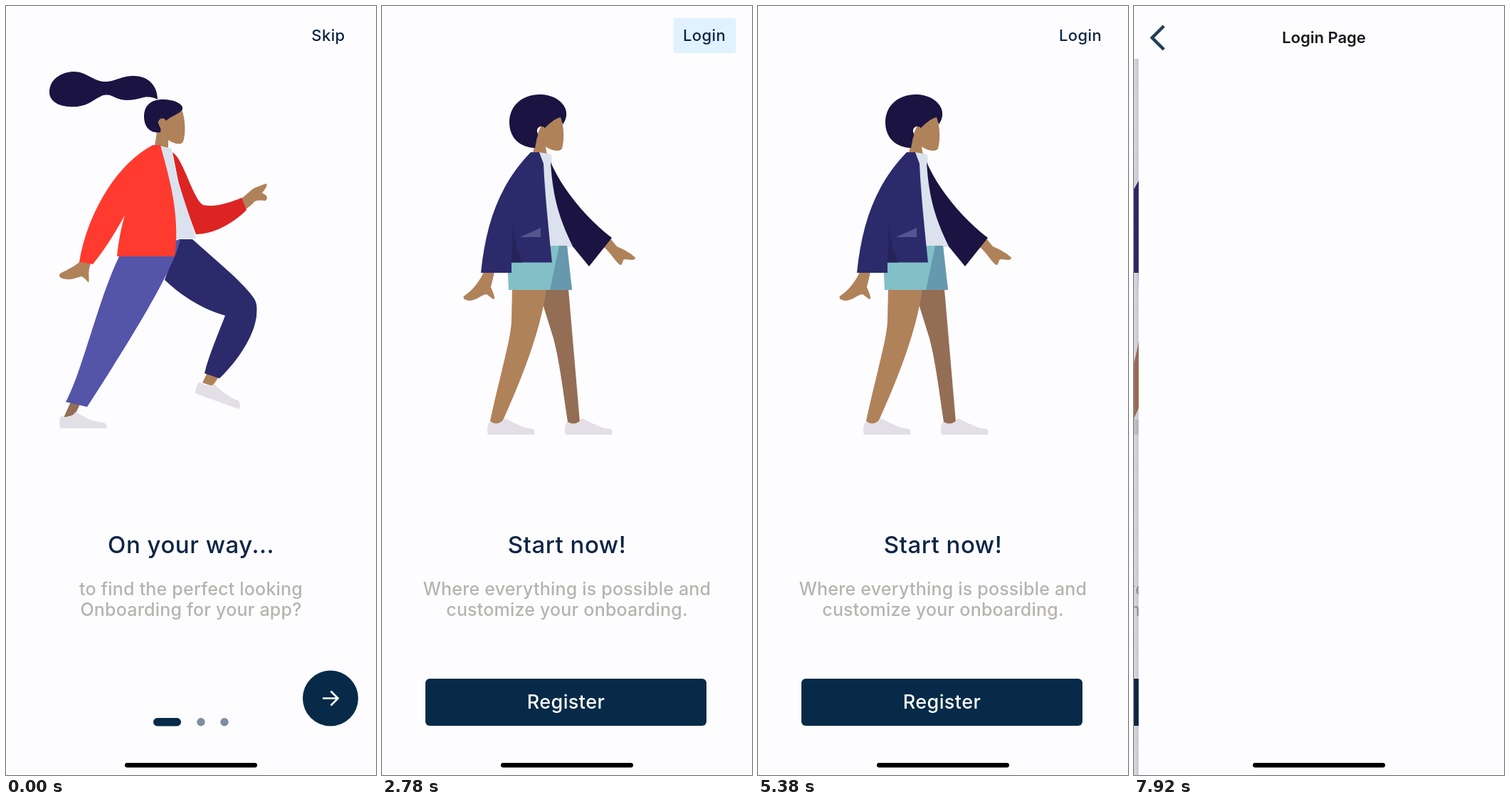
An HTML page that plays this animation: 520 px wide and 1078 px high, repeating every 8 s.

```html
<!DOCTYPE html>
<html lang="en">
<head>
<meta charset="utf-8">
<title>Onboarding</title>
<style>
html, body { margin: 0; height: 100%; overflow: hidden; background: #fdfcff; }
svg { display: block; width: 100vw; height: 100vh; }
text { font: 500 22px Inter, sans-serif; letter-spacing: .4px; text-anchor: middle; fill: #0c2545; }
.title { font-size: 33px; letter-spacing: .5px; }
.sub { font-size: 25px; letter-spacing: .2px; fill: #b6b4ae; }
.button { font-size: 27px; fill: #fff; }
.nav { font-weight: 600; letter-spacing: 0; fill: #18181b; }
.hair { fill: #1b1442; }
.skin { fill: #b0825a; }
.shade { fill: #936e55; }
.shoe { fill: #e3dfe6; }
.shirt { fill: #dbe2ee; }
.navy { fill: #2b2b6b; }
.brand { fill: #062a47; }
.dot { fill: #7d8ea0; }
</style>
</head>
<body>
<svg viewBox="0 0 520 1078" preserveAspectRatio="none">
  <defs>
    <linearGradient id="edge">
      <stop offset="0" stop-color="#2a1838" stop-opacity="0"/>
      <stop offset=".6" stop-color="#2a1838" stop-opacity=".07"/>
      <stop offset="1" stop-color="#2a1838" stop-opacity=".19"/>
    </linearGradient>
  </defs>
  <rect width="520" height="1078" fill="#fdfcff"/>

  <g id="intro">
    <path class="hair" d="M61 121C61 100 82 92 95 92C115 92 122 107 142 106C155 105 162 98 180 98C200 98 213 112 213 131C207 128 200 126 190 129C175 133 163 133 153 128C140 121 135 125 122 133C110 141 98 142 88 141C72 140 61 132 61 121Z"/>
    <path class="skin" d="M212 177L209 196L228 199V188C236 193 246 196 249 190C253 178 252 158 247 145L215 158Z"/>
    <path class="hair" d="M194 155C194 140 203 131 220 131C238 131 250 138 248 145C243 152 232 154 225 161C222 155 214 157 214 164C215 169 219 171 217 177C203 179 194 170 194 155Z"/>
    <path class="skin" d="M330 270C340 264 345 256 352 254L365 249C368 250 367 253 360 262L365 265C368 268 367 272 364 273C354 272 350 272 347 277L337 285Z"/>
    <path fill="#dc2423" d="M234 205C250 215 262 270 277 279C295 283 315 275 331 269L338 286C318 306 290 320 267 320L245 260Z"/>
    <path class="shirt" d="M217 196L233 200C235 235 258 290 267 326L238 327Z"/>
    <path class="skin" d="M283 514L299 520L290 533L276 528Z"/>
    <path class="navy" d="M243 327H262C290 352 330 385 345 405C353 415 353 420 352 435C348 465 325 498 300 522L279 515C285 490 300 455 308 434C275 425 245 405 223 384Z"/>
    <path class="shoe" d="M272 527C278 533 288 532 294 531C305 542 316 550 326 553C330 557 330 562 327 565L266 543C266 537 268 531 272 527Z"/>
    <path class="shade" d="M91 555L104 558L97 573L81 577Z"/>
    <path fill="#5455a8" d="M160 349L245 327C238 360 200 430 114 562L84 555C108 510 130 410 160 349Z"/>
    <path class="shoe" d="M77 574C83 578 92 577 98 569C108 575 120 583 137 584C142 586 142 590 141 592H76C75 586 75 580 77 574Z"/>
    <path class="skin" d="M104 358C98 364 88 369 76 375C73 379 77 383 86 383C93 384 98 381 106 379C110 381 113 384 116 388C118 383 114 374 119 361Z"/>
    <path fill="#ff3a2f" d="M206 195H217C226 230 246 290 237 351H156C158 330 162 310 167 293C155 315 140 340 122 362L103 359C112 300 150 225 206 195Z"/>
    <text class="title" x="260" y="767">On your way...</text>
    <text class="sub" x="260" y="826">to find the perfect looking</text>
    <text class="sub" x="260" y="855">Onboarding for your app?</text>
    <rect class="brand" x="207" y="998" width="39" height="11.5" rx="5.7"/>
    <circle class="dot" cx="274" cy="1003.7" r="5.7"/>
    <circle class="dot" cx="307" cy="1003.7" r="5.7"/>
    <circle class="brand" cx="456" cy="970.5" r="39"/>
    <path d="M445 970.5H466M456.500 960.500L466.500 970.500L456.500 980.500" fill="none" stroke="#fff" stroke-width="2.700"/>
  </g>

  <g id="start">
    <path class="skin" d="M217 183L212 206L232 209L230 197C238 203 249 205 253 200C257 185 255 165 251 155L225 165Z"/>
    <path class="hair" d="M215 199C192 198 179 183 179 163C179 139 198 124 222 124C244 124 261 138 259 154C258 160 256 163 254 166L251 156C242 158 234 166 229 171C224 166 217 170 218 176C219 180 220 181 218 184Z"/>
    <path class="skin" d="M320 325L330 337C340 341 352 348 356 353C356 357 350 356 341 355C337 357 339 361 336 363C330 362 325 350 312 338Z"/>
    <path class="shirt" d="M221 205L238 208C240 260 258 310 268 338L237 336Z"/>
    <path class="hair" d="M237 219C255 260 290 300 323 325L291 365L268 337C250 300 240 270 237 219Z"/>
    <path class="shade" d="M226 397H262L278 583C273 587 265 586 261 583C255 545 250 500 241 466L226 418Z"/>
    <path class="skin" d="M183 397H231C222 460 195 525 169 583C163 587 156 586 152 582C165 520 182 465 182 440Z"/>
    <path fill="#82bfc7" d="M176 358L236 336H260L267 398H178Z"/>
    <path fill="#6699ae" d="M249 336H260L267 398H236Z"/>
    <path id="shoe" class="shoe" d="M151 583C158 587 166 587 172 578C182 582 195 590 205 592C213 592 216 594 214 601H149C147 594 148 587 151 583Z"/>
    <use href="#shoe" x="109"/>
    <path class="skin" d="M143 373C137 386 127 399 116 406C112 409 116 412 122 413C133 413 139 405 147 404L156 411C160 411 158 406 153 394L158 373Z"/>
    <path class="navy" d="M209 205H221L227 221C229 265 234 310 239 359.500H182V374H139C146 305 165 250 209 205Z"/>
    <path fill="#25235a" d="M184 302C186 325 190 345 197 359.500H182Z"/>
    <path fill="#55558f" d="M194 324L223 311V324Z"/>
    <text class="title" x="260" y="767">Start now!</text>
    <text class="sub" x="260" y="826">Where everything is possible and</text>
    <text class="sub" x="260" y="855">customize your onboarding.</text>
    <rect class="brand" x="61" y="943" width="395" height="66" rx="6"/>
    <text class="button" x="258.500" y="985">Register</text>
  </g>

  <g id="cover">
    <rect id="dim" x="-520" width="520" height="1078" fill="#2a1838"/>
    <rect x="-17" width="17" height="1078" fill="url(#edge)"/>
    <rect width="520" height="1078" fill="#fdfcff"/>
  </g>
  <rect id="header" width="520" height="71" fill="#fdfcff"/>

  <rect id="glow" y="17" height="49" rx="4" fill="#e1f2ff"/>
  <text id="action" x="453" y="49"></text>
  <g id="nav">
    <path d="M42 28L25.500 44.500L42 61" fill="none" stroke="#203f57" stroke-width="4.500"/>
    <text class="nav" x="267" y="52">Login Page</text>
  </g>
  <rect x="167" y="1061" width="186" height="6.500" rx="3.200"/>
</svg>
<script>
const LOOP = 8000, PRESS = 2200, JUMP = 2700, RELEASE = 3700, PUSH = 7006;
const $ = id => document.getElementById(id);
const set = (id, name, value) => $(id).setAttribute(name, value);
const ramp = (v, from, to) => Math.min(1, Math.max(0, (v - from) / (to - from)));

// Critically damped spring from 0 to 1
function spring(ms) {
  const a = Math.max(0, ms) * .00695;
  return 1 - (1 + a) * Math.exp(-a);
}

function draw(t) {
  const onStart = t >= JUMP;
  set('intro', 'display', onStart ? 'none' : 'inline');
  set('start', 'display', onStart ? 'inline' : 'none');
  $('action').textContent = onStart ? 'Login' : 'Skip';

  set('glow', 'x', onStart ? 409.5 : 415);
  set('glow', 'width', onStart ? 88 : 77.5);
  set('glow', 'opacity', ramp(t, PRESS, PRESS + 120) * (1 - ramp(t, RELEASE, RELEASE + 200)));

  const p = spring(t - PUSH), late = ramp(p, .72, .97);
  const pushed = t > PUSH ? 'inline' : 'none';
  set('start', 'transform', `translate(${-p * 520 / 3} 0)`);
  set('cover', 'transform', `translate(${520 * (1 - p)} 0)`);
  set('cover', 'display', pushed);
  set('header', 'display', pushed);
  set('header', 'height', 71 + 3 * late);
  set('dim', 'opacity', .08 * late);
  set('action', 'opacity', 1 - p < .03 ? 0 : 1 - p);
  set('nav', 'opacity', late);
}

function tick() {
  draw(performance.now() % LOOP);
  requestAnimationFrame(tick);
}
tick();
</script>
</body>
</html>
```
